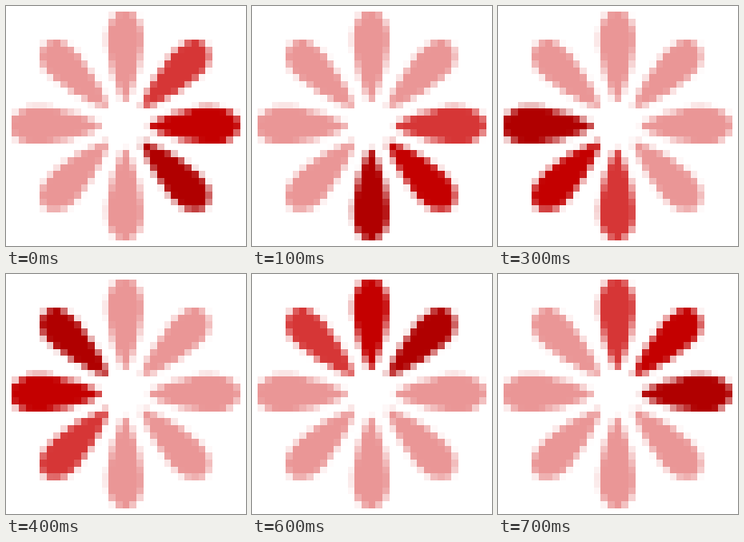
An HTML page with a canvas for the animation above (0.8 s loop, 300 by 300 pixels).

```html
<!DOCTYPE html>
<html lang="en">
<head>
<meta charset="utf-8">
<title>Spinner</title>
<style>
  html, body { margin: 0; width: 100%; height: 100%; overflow: hidden; background: #fff; }
  canvas { display: block; }
</style>
</head>
<body>
<canvas id="stage" width="300" height="300"></canvas>
<script>
const GRID = 33, CELL = 8.643, EDGE = 150 - GRID * CELL / 2;
const PETALS = 8, STEP = 100, START = 3; // the head starts at the lower right
const TRAIL = ['#b00000', '#c40000', '#d63636'];
const REST = '#ea9696';
const petal = new Path2D(
  'M0-3.4C-.7-3.5-2.6-9.5-2.6-12.6C-2.6-15-1.5-16.65 0-16.65' +
  'C1.5-16.65 2.6-15 2.6-12.6C2.6-9.5 .7-3.5 0-3.4Z');

const stage = document.getElementById('stage').getContext('2d');
stage.imageSmoothingEnabled = false;
const small = document.createElement('canvas');
small.width = small.height = GRID;
const ctx = small.getContext('2d');

// Petals are drawn on the small grid, then enlarged to hard-edged cells.
function draw(ms) {
  const head = START + Math.floor(ms / STEP) % PETALS;
  ctx.fillStyle = '#fff';
  ctx.fillRect(0, 0, GRID, GRID);
  for (let i = 0; i < PETALS; i++) {
    const age = (head - i + PETALS) % PETALS;
    ctx.save();
    ctx.translate(16.35, 16.42);
    ctx.rotate(i * 2 * Math.PI / PETALS);
    ctx.fillStyle = TRAIL[age] || REST;
    ctx.fill(petal);
    ctx.restore();
  }
  stage.clearRect(0, 0, 300, 300);
  stage.drawImage(small, EDGE, EDGE, GRID * CELL, GRID * CELL);
}

let start;
function tick(now) {
  start ??= now;
  draw(now - start);
  requestAnimationFrame(tick);
}
draw(0);
requestAnimationFrame(tick);
</script>
</body>
</html>
```
